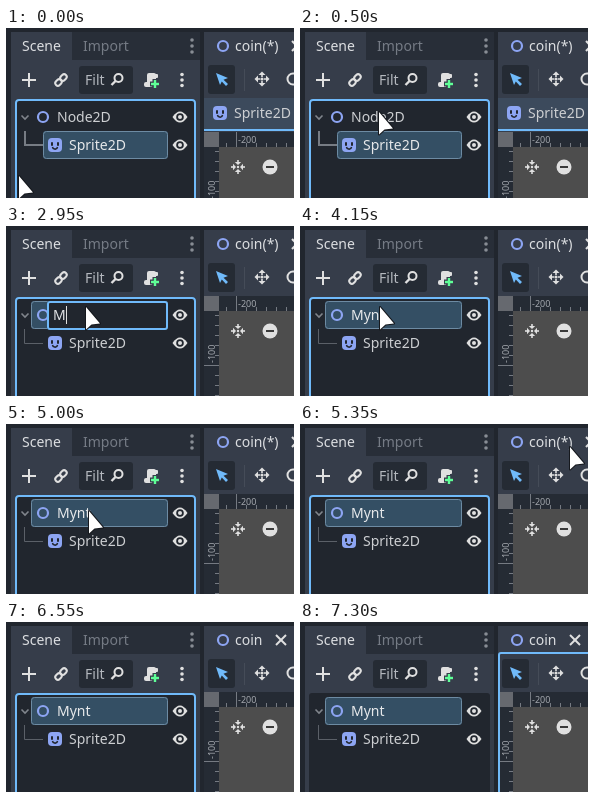
An HTML page with a canvas that plays this animation: 288 by 170 pixels, repeating every 8900 ms.

```html
<!DOCTYPE html>
<html>
<head>
<meta charset="utf-8">
<style>
html, body { margin: 0; width: 288px; height: 170px; overflow: hidden; background: #21262e; }
canvas { display: block; }
</style>
</head>
<body>
<canvas id="stage" width="288" height="170"></canvas>
<script>
const c = document.getElementById('stage').getContext('2d');
const LOOP = 8900, STEP = 50;
const BASE = '#363d4a', DARK = '#21262e', FIELD = '#252b34', ACCENT = '#70bafa',
  LIGHT = '#e0e0e0', TEXT = '#cdcfd2', NODE = '#8da5f3';

// time, x, y of the pointer tip
const path = [
  [50, 12, 147], [200, 28, 132], [350, 65, 98], [500, 78, 83], [650, 78, 83], [750, 79, 80],
  [4950, 79, 80], [5000, 82, 86], [5100, 126, 80], [5200, 205, 51], [5300, 258, 27],
  [5350, 269, 22], [5450, 270, 21], [5600, 265, 18], [5800, 258, 19],
  [5900, 257, 20], [6050, 258, 27], [6150, 260, 50], [6200, 263, 83]
];

function box(x, y, w, h, fill, r = 0) {
  c.fillStyle = fill;
  c.beginPath();
  c.roundRect(x, y, w, h, r);
  c.fill();
}

function frame(x, y, w, h, color, lw, r = 0) {
  c.strokeStyle = color;
  c.lineWidth = lw;
  c.beginPath();
  c.roundRect(x + lw / 2, y + lw / 2, w - lw, h - lw, r);
  c.stroke();
}

function line(color, lw, ...pts) {
  c.strokeStyle = color;
  c.lineWidth = lw;
  c.beginPath();
  for (let i = 0; i < pts.length; i += 2) c.lineTo(pts[i], pts[i + 1]);
  c.stroke();
}

function shape(color, ...pts) {
  c.fillStyle = color;
  c.beginPath();
  for (let i = 0; i < pts.length; i += 2) c.lineTo(pts[i], pts[i + 1]);
  c.closePath();
  c.fill();
}

function ring(x, y, r, color, lw) {
  c.strokeStyle = color;
  c.lineWidth = lw;
  c.beginPath();
  c.arc(x, y, r, 0, 7);
  c.stroke();
}

function dot(x, y, r, color) {
  c.fillStyle = color;
  c.beginPath();
  c.arc(x, y, r, 0, 7);
  c.fill();
}

function text(s, x, y, color = TEXT, size = 14) {
  c.font = size + 'px "Noto Sans", "Open Sans", sans-serif';
  c.fillStyle = color;
  c.fillText(s, x, y);
  return c.measureText(s).width;
}

function at(x, y, draw, turn = 0) {
  c.save();
  c.translate(x, y);
  c.rotate(turn);
  draw();
  c.restore();
}

function fourWays(x, y, draw) {
  for (let i = 0; i < 4; i++) at(x, y, draw, i * Math.PI / 2);
}

function eye(x, y) {
  c.fillStyle = LIGHT;
  c.beginPath();
  c.moveTo(x - 7.5, y);
  c.quadraticCurveTo(x, y - 11, x + 7.5, y);
  c.quadraticCurveTo(x, y + 11, x - 7.5, y);
  c.fill();
  dot(x, y, 3.8, DARK);
  dot(x, y, 2, LIGHT);
}

function spriteIcon(x, y) {
  box(x - 7, y - 7, 14, 14, NODE, 4);
  box(x - 4, y - 3, 2, 4, DARK, 1);
  box(x + 2, y - 3, 2, 4, DARK, 1);
  c.strokeStyle = DARK;
  c.lineWidth = 1.5;
  c.beginPath();
  c.arc(x, y + 1.5, 2.6, 0.2, Math.PI - 0.2);
  c.stroke();
}

function link() {
  for (const s of [-1, 1]) {
    c.strokeStyle = LIGHT;
    c.lineWidth = 2;
    c.beginPath();
    c.roundRect(s * 3.5 - 3.5, -2.6, 7, 5.2, 2.6);
    c.stroke();
  }
}

function selectedRow(x, y) {
  box(x, y, 162 - x, 28, '#344f64', 3);
  frame(x, y, 162 - x, 28, '#6d8ba3', 1, 3);
}

function sceneDock() {
  box(5, 4, 189, 28, '#282e38');
  box(5, 4, 61, 28, BASE);
  box(5, 32, 189, 138, BASE);
  text('Scene', 16, 23, '#dcdee1');
  text('Import', 77, 23, '#757b85');
  for (const y of [12, 18, 24]) dot(186, y, 1.8, '#888d95');

  line(LIGHT, 2, 16, 52, 30, 52);
  line(LIGHT, 2, 23, 45, 23, 59);
  at(55, 52, link, -Math.PI / 4);
  box(73, 38, 54, 28, FIELD, 3);
  text('Filt', 79, 57, '#b4b8be');
  ring(112.5, 50, 4, LIGHT, 2);
  line(LIGHT, 2.4, 109.5, 53, 105.5, 57);

  box(141, 45, 9, 12, LIGHT, 2);
  box(138, 54, 9, 5, LIGHT, 2);
  box(148, 46, 4, 4, LIGHT, 1);
  line(BASE, 5, 149, 51, 149, 61);
  line(BASE, 5, 144, 56, 154, 56);
  line('#5fff97', 2.4, 149, 52, 149, 60);
  line('#5fff97', 2.4, 145, 56, 153, 56);
  for (const y of [46.5, 52, 57.5]) dot(176, y, 1.8, LIGHT);
}

function tree(t) {
  const rootSelected = t >= 900, editing = t >= 1000 && t < 4100;
  const name = t < 2950 ? 'Node2D'
    : 'Mynt'.slice(0, 1 + (t >= 3250) + (t >= 3450) + (t >= 3550));
  box(9, 71, 181, 110, DARK, 3);
  if (t < 7200) frame(9, 71, 181, 110, ACCENT, 2, 3);
  if (rootSelected) selectedRow(25, 75);
  else selectedRow(37, 103);
  if (rootSelected) line('#5b6068', 1, 18.5, 103, 18.5, 117.5, 37, 117.5);
  else line('#777c84', 2, 19, 103, 19, 117, 37, 117);
  line('#80858c', 1.6, 15.5, 87.5, 19, 91, 22.5, 87.5);
  ring(37, 89, 5, NODE, 2.2);
  spriteIcon(49, 117);
  text('Sprite2D', 63, 122, rootSelected ? TEXT : '#e6e8ea');
  eye(174, 89);
  eye(174, 117);

  if (!editing) {
    text(name, 51, 94, rootSelected ? '#e6e8ea' : TEXT);
    return;
  }
  box(41, 75, 121, 29, DARK, 2);
  frame(41, 75, 121, 29, ACCENT, 2, 2);
  const fresh = t < 2950;
  if (fresh) box(47, 80, 54, 18, '#416482');
  const w = text(name, 47, 94, '#dfe1e4');
  const caretOn = !fresh || t < 1550 || (t >= 2100 && t < 2650);
  if (caretOn) box(fresh ? 47 : 47 + Math.round(w), 80, 1, 18, LIGHT);
}

function ruler(top) {
  box(198, top, 90, 15, FIELD);
  box(198, top, 15, 100, FIELD);
  box(198, top, 15, 15, '#66696f');
  box(213, top + 15, 75, 100, '#4d4d4d');
  const tick = '#757a82';
  for (let x = 220; x < 288; x += 10) box(x, top + (x === 230 ? 0 : 11), 1, x === 230 ? 15 : 4, tick);
  for (let y = 19; y < 100; y += 10) box(y === 69 ? 198 : 209, top + y, y === 69 ? 15 : 4, 1, tick);
  text('-200', 232, top + 11, '#a4a8ae', 9);
  at(209, top + 67, () => text('-100', 0, 0, '#a4a8ae', 9), -Math.PI / 2);

  const y = top + 35;
  fourWays(232, y, () => {
    shape(LIGHT, 0, -2, -3.2, -5, 3.2, -5);
    line(LIGHT, 1.6, 0, -4, 0, -7);
  });
  dot(232, y, 1.2, LIGHT);
  dot(264, y, 7.5, LIGHT);
  box(260, y - 1, 8, 2, '#3a3a3a');
}

function viewport(t) {
  const saved = t >= 6550;
  box(198, 4, 90, 166, BASE);
  ring(217, 18, 5, NODE, 2.2);
  text(saved ? 'coin' : 'coin(*)', 229, 23, '#dcdee1');
  const x = saved ? 275 : 291;
  line(LIGHT, 2, x - 5, 13, x + 5, 23);
  line(LIGHT, 2, x - 5, 23, x + 5, 13);

  box(202, 37, 27, 29, FIELD, 3);
  shape(ACCENT, 210, 45, 222, 50, 217.5, 51.8, 222, 56, 220, 58, 215.8, 53.5, 214, 57);
  box(238, 41, 1, 22, '#454c58');
  fourWays(256, 51, () => {
    shape(LIGHT, 0, -7.5, -3.5, -4, 3.5, -4);
    line(LIGHT, 1.6, 0, -4, 0, -2);
  });
  dot(256, 51, 1.6, LIGHT);
  ring(287, 51, 5.5, LIGHT, 2);

  if (t < 900) {
    box(198, 70, 90, 32, '#3c4a5c');
    box(198, 101, 90, 2, ACCENT);
    spriteIcon(214, 85);
    text('Sprite2D', 228, 90);
  }
  ruler(t < 900 ? 104 : 70);
  if (t >= 7200) frame(198, 30, 100, 150, ACCENT, 2, 2);
}

function pointer(t) {
  if (t >= 6250) return;
  let i = path.findIndex(p => p[0] > t);
  if (i < 0) i = path.length - 1;
  const b = path[i], a = path[Math.max(0, i - 1)];
  const k = a === b ? 0 : Math.min(1, (t - a[0]) / (b[0] - a[0]));
  at(Math.round(a[1] + (b[1] - a[1]) * k), Math.round(a[2] + (b[2] - a[2]) * k), () => {
    c.beginPath();
    for (const [x, y] of [[1, 1], [1, 23.5], [6.5, 18.5], [15, 17.5]]) c.lineTo(x, y);
    c.closePath();
    c.lineJoin = 'round';
    c.lineWidth = 2;
    c.strokeStyle = '#15181d';
    c.stroke();
    c.fillStyle = '#fff';
    c.fill();
  });
}

function draw(now) {
  const t = Math.floor(now % LOOP / STEP) * STEP;
  box(0, 0, 288, 170, DARK);
  sceneDock();
  tree(t);
  viewport(t);
  pointer(t);
  requestAnimationFrame(() => draw(performance.now() - start));
}

const start = performance.now();
draw(0);
</script>
</body>
</html>
```
